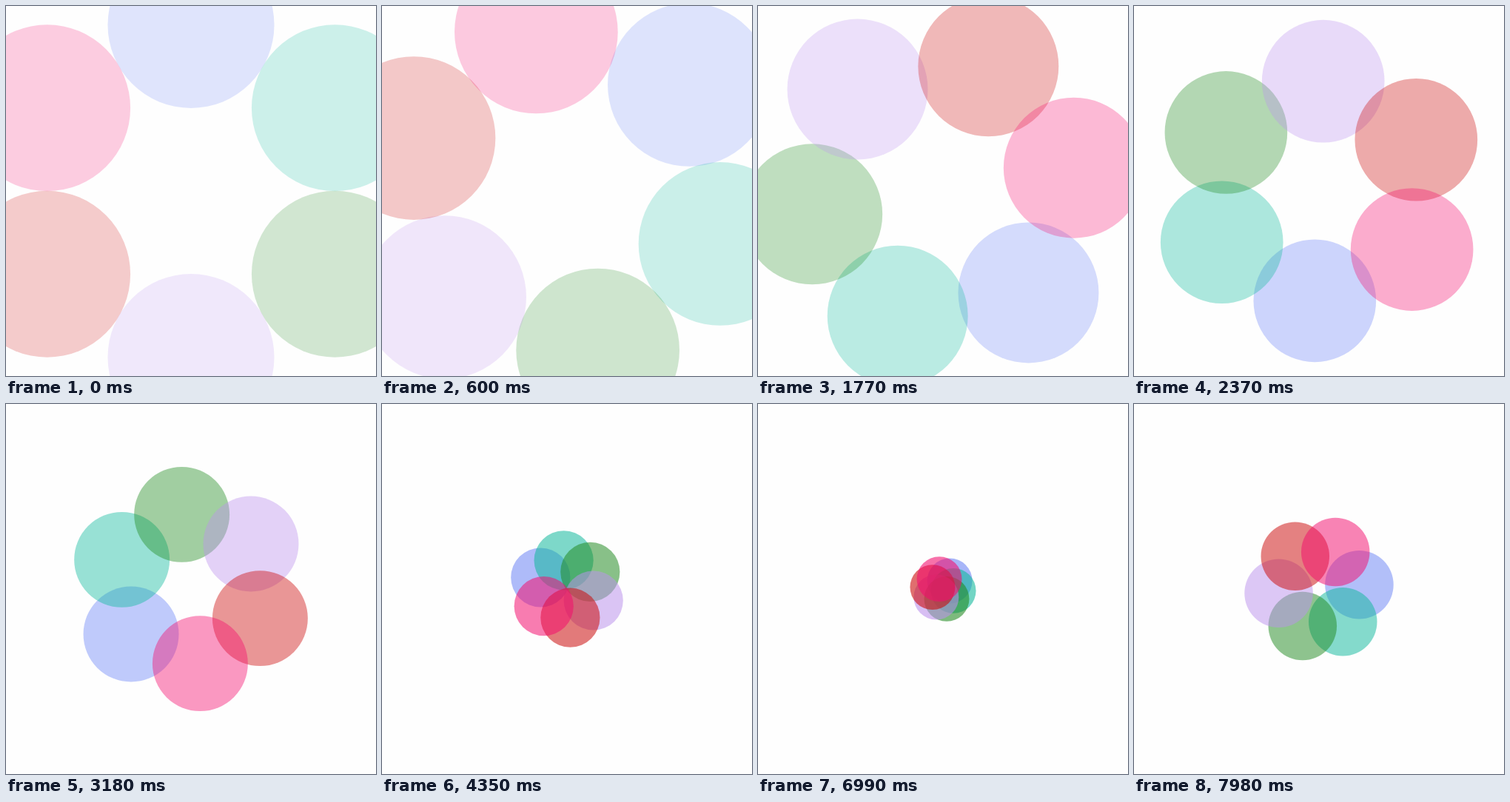
Recreate the animation shown at these times as an HTML page. Size 500 px wide and 500 px high, loop 8 s.

```html
<!DOCTYPE html>
<html lang="en">
<head>
<meta charset="utf-8">
<title>Circling dots</title>
<style>
  html, body { margin: 0; width: 100%; height: 100%; overflow: hidden; background: #fefefe; }
  svg { display: block; width: 100%; height: 100%; }
</style>
</head>
<body>
<svg viewBox="0 0 500 500"></svg>
<script>
  const LOOP = 8000;   // ms shown before the jump back
  const CYCLE = 12000; // ms for one full breath in and out
  const STEP = 30;     // ms per drawn step

  // Bottom to top, with the starting angle in degrees
  const dots = [
    ['rgb(105,130,245)', -90],
    ['rgb(14,184,156)', -30],
    ['rgb(34,139,34)', 30],
    ['rgb(188,146,237)', 90],
    ['rgb(203,8,8)', 150],
    ['rgb(243,13,110)', 210]
  ].map(([color, angle]) => {
    const el = document.createElementNS('http://www.w3.org/2000/svg', 'circle');
    el.setAttribute('fill', color);
    document.querySelector('svg').append(el);
    return { el, angle };
  });

  function draw(now) {
    const t = Math.floor((now % LOOP) / STEP) * STEP;
    const phase = 2 * Math.PI * t / CYCLE;
    const swell = Math.cos(phase);
    const orbit = 112 + 112.5 * swell;
    const radius = 68.6 + 43.9 * swell;
    const opacity = 0.405 - 0.2 * swell;
    const turn = 0.06015 * t + 41.9 * Math.sin(phase);

    for (const { el, angle } of dots) {
      const a = (angle + turn) * Math.PI / 180;
      el.setAttribute('cx', 250 + orbit * Math.cos(a));
      el.setAttribute('cy', 250 + orbit * Math.sin(a));
      el.setAttribute('r', radius);
      el.setAttribute('fill-opacity', opacity);
    }
  }

  function tick(now) {
    draw(now);
    requestAnimationFrame(tick);
  }
  draw(0);
  requestAnimationFrame(tick);
</script>
</body>
</html>
```
